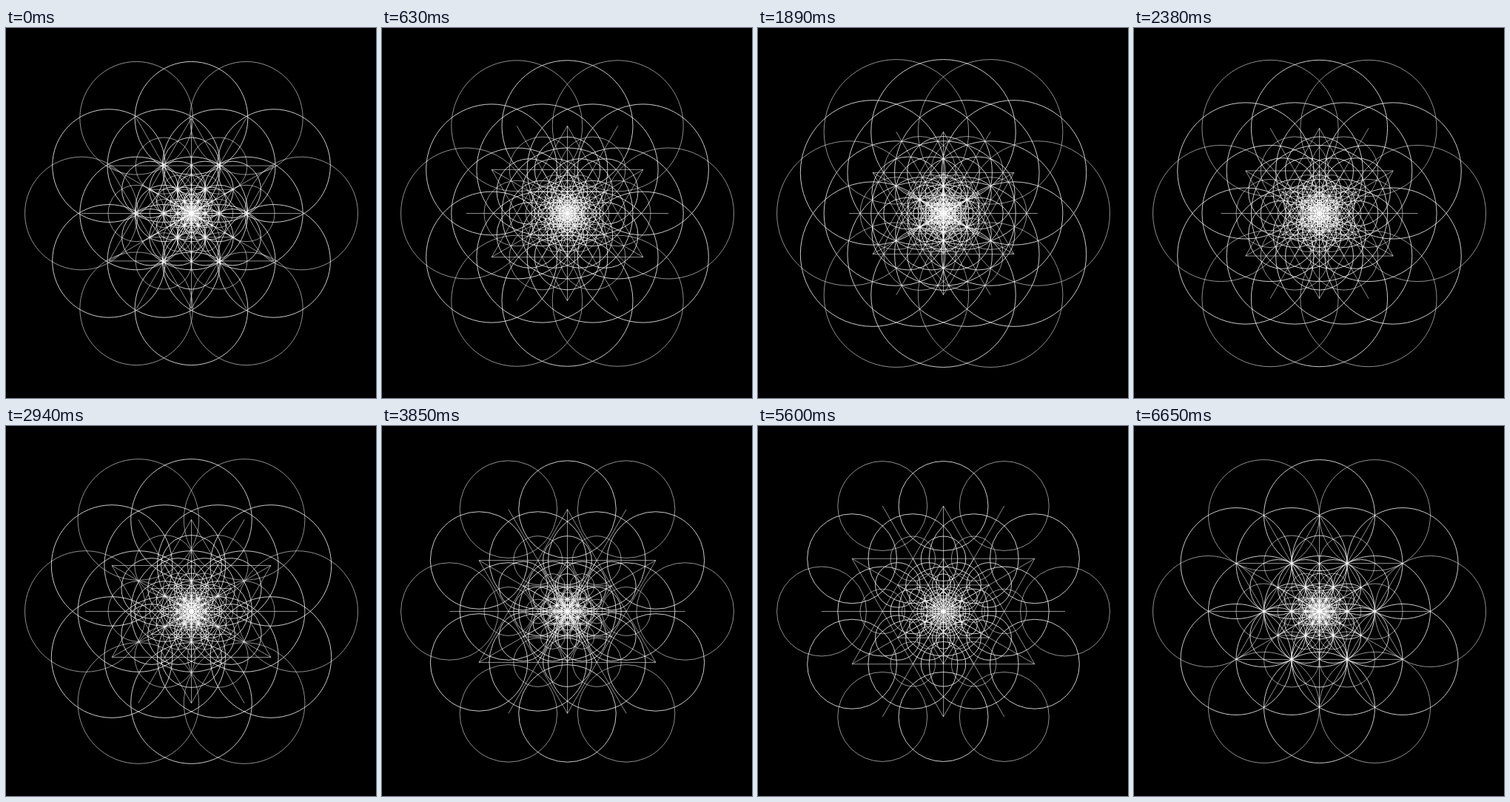
Recreate the animation shown at these times as an HTML page with a canvas. Size 500 px wide and 500 px high, loop 6720 ms.

```html
<!DOCTYPE html>
<html lang="en">
<head>
<meta charset="utf-8">
<title>Breathing flower</title>
<style>
  html, body { margin: 0; width: 100%; height: 100%; overflow: hidden; background: #000; }
  canvas { display: block; width: 500px; height: 500px; }
</style>
</head>
<body>
<canvas id="stage" width="500" height="500"></canvas>
<script>
const ctx = document.getElementById('stage').getContext('2d');
const STEP = 70;
const STEPS = 96;
const EXTENT = 225;
const LEVELS = 4;
const BRIGHT = 'rgba(255,255,255,0.88)';
const DIM = 'rgba(255,255,255,0.62)';

// Six points around the centre, the first at the given angle
function hexagon(radius, turn) {
  return Array.from({ length: 6 }, (_, i) => {
    const a = turn + i * Math.PI / 3;
    return [radius * Math.cos(a), radius * Math.sin(a)];
  });
}

function circles(centres, r, colour) {
  ctx.strokeStyle = colour;
  for (const [x, y] of centres) {
    ctx.beginPath();
    ctx.arc(x, y, r, 0, Math.PI * 2);
    ctx.stroke();
  }
}

function lines(pairs, colour) {
  ctx.strokeStyle = colour;
  ctx.beginPath();
  for (const [a, b] of pairs) {
    ctx.moveTo(...a);
    ctx.lineTo(...b);
  }
  ctx.stroke();
}

const diameters = p => [0, 1, 2].map(i => [p[i], p[i + 3]]);
const star = p => p.map((a, i) => [a, p[(i + 2) % 6]]);

// Nineteen circles with a hexagram and its axes
function flower(gap, r) {
  const inner = hexagon(gap, 0);
  const corners = hexagon(gap * 2, 0);
  const mids = hexagon(gap * Math.sqrt(3), Math.PI / 6);
  circles(corners, r, DIM);
  circles([[0, 0], ...inner, ...mids], r, BRIGHT);
  lines([...diameters(corners), ...diameters(mids)], DIM);
  lines(star(mids), DIM);
}

function draw(step) {
  const swing = Math.sin((step + 1) / STEPS * Math.PI * 2);
  const ratio = (1 - 0.2 * swing) ** 2;
  const r = EXTENT / (1 + 2 * ratio);
  const gap = r * ratio;

  ctx.setTransform(1, 0, 0, 1, 0, 0);
  ctx.fillStyle = '#000';
  ctx.fillRect(0, 0, 500, 500);
  ctx.translate(250.5, 250.5);
  ctx.lineWidth = 0.9;
  for (let i = 0; i < LEVELS; i++) {
    const scale = 0.5 ** i;
    flower(gap * scale, r * scale);
  }
}

const start = performance.now();
function tick() {
  const time = performance.now() - start;
  draw(Math.floor(time / STEP) % STEPS);
  requestAnimationFrame(tick);
}
tick();
</script>
</body>
</html>
```
